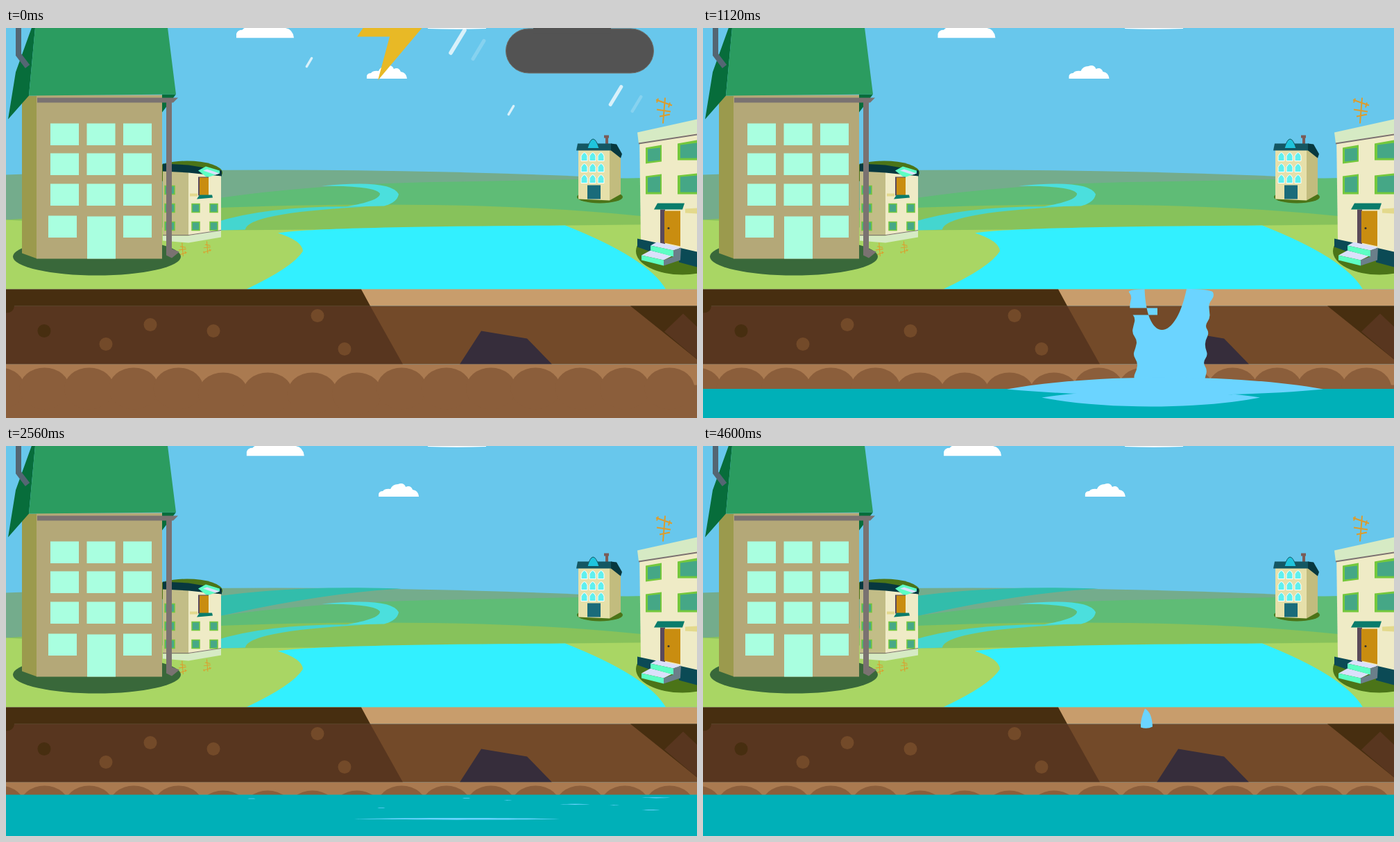
Recreate the animation shown at these times as an HTML page. Size 996x562 px, loop 4.64 s.

```html
<!DOCTYPE html>
<html lang="en">
<head>
<meta charset="utf-8">
<title>Rain seeping into the ground</title>
<style>
html, body { margin: 0; width: 100%; height: 100%; overflow: hidden; background: #68c7ec; }
svg { display: block; width: 100vw; height: 100vh; }
</style>
</head>
<body>
<svg viewBox="0 .5 996 562" preserveAspectRatio="none">
<defs>
  <path id="puff" d="M0 19V15Q1 11 6 11Q9 7 17 8Q20 1 28 1Q36-2 39 5Q46 2 49 9Q57 10 58 19Z" fill="#fff"/>
  <path id="aerial" d="M950 101L947 138M937 104l23 8M938 118l20 3M942 128l15-3M940 102l-2 6M957 108l-2 7" fill="none" stroke="#dd9c2c" stroke-width="2"/>
  <mask id="gaps" maskUnits="userSpaceOnUse" x="0" y="0" width="996" height="570">
    <path fill="#fff" d="M0 0H996V570H0Z"/><path id="gap"/>
  </mask>
  <clipPath id="below"><path d="M0 377H996V570H0Z"/></clipPath>
</defs>

<!-- sky -->
<use id="cloudA" href="#puff"/>
<use id="cloudB" href="#puff"/>
<path fill="#fff" d="M608 0H692V1.5Q650 3 608 1.5Z"/>
<path id="bolt" fill="#e8b926" d="M515 0H600L536 76L553 13H506Z"/>
<g id="storm" fill="#535353" stroke="#706f69"><rect x="720.5" y="1.5" width="213" height="64" rx="33"/><path stroke="none" d="M760 0h112v8h-112z"/></g>

<!-- hills and water -->
<path fill="#74ac8c" d="M0 212Q420 197 820 214L996 222V300H0Z"/>
<path id="farRiver" fill="#32bdab" d="M240 228Q380 199 570 206Q430 214 240 262Z"/>
<path fill="#5fbc76" d="M200 265Q380 225 650 222L996 215V300H200Z"/>
<path fill="#87c25b" d="M0 277Q560 236 910 271L996 278V310H0Z"/>
<path fill="#4bdfdd" d="M455 228Q556 218 566 240Q564 252 545 257L490 258Q540 249 539 239Q532 228 455 228Z"/>
<path fill="#44d6cf" d="M520 258Q380 255 300 281V293L345 291Q348 267 520 258Z"/>
<path fill="#a9d664" d="M0 277L310 292L600 290L806 285L996 283V377H0Z"/>
<path fill="#32f0ff" d="M392 296Q440 287 806 285Q925 332 951 377H346Q414 345 428 322Q427 307 392 296Z"/>

<!-- small house, left -->
<ellipse cx="261" cy="209" rx="51" ry="17" fill="#4b7418"/>
<path fill="#c2bd87" d="M226 206L263 208V300H226Z"/>
<path fill="#efebc6" d="M263 207L310 212V294L263 300Z"/>
<path fill="#07383f" d="M226 196L263 198L311 206V214L263 209L226 207Z"/>
<path fill="#5dffc4" d="M277 206L288 200L308 206V210L290 216Z"/>
<path fill="#dbe0fb" d="M284 206L290 204L308 210L302 212Z"/>
<path fill="#d6eac4" d="M226 300L263 300L310 292V302L263 310L226 307Z"/>
<path fill="none" stroke="#7a7271" d="M226 299H263L310 292"/>
<path fill="#5a4a5a" d="M277 215h15v27h-15z"/><path fill="#c98d10" d="M279 216h13v26h-13z"/>
<path fill="#0a7c6b" d="M279 241H297L298 245L275 247Z"/>
<path fill="#e3d98c" d="M265 239h11v4h-11z"/>
<g id="smallPanes" fill="#47a887" stroke="#74c83c" stroke-width="1.5"></g>
<use href="#aerial" transform="translate(-251 383) scale(.533 -.53)"/>
<use href="#aerial" transform="translate(-186 374) scale(.502 -.48)"/>

<!-- big house, left -->
<ellipse cx="131" cy="330" rx="121" ry="27" fill="#39683a"/>
<path fill="#9b9a4d" d="M23 98H45V333L23 325Z"/>
<path fill="#b4a878" d="M44 97H225V333H44Z"/>
<path fill="#076d3b" d="M37 0L14 64L3 132L33 98L42 0ZM225 96H245L225 122Z"/>
<path fill="#2b9c60" d="M42 0H233L245 96L33 98Z"/>
<path fill="none" stroke="#546673" stroke-width="8" d="M18 0V39L31 56"/>
<path fill="#7a7271" d="M45 101H248L241 108H239V319L250 323L239 332L231 328V108H45Z"/>
<g id="panes" fill="#a9ffe0"><path d="M117 272h41v61h-41z"/></g>

<!-- small house, right -->
<ellipse cx="856" cy="244" rx="33" ry="9" fill="#4b7418"/>
<path fill="#e6e0aa" d="M825 175H870V249L825 247Z"/>
<path fill="#c2bc7e" d="M870 175L886 186V240L870 249Z"/>
<path fill="#7a5c58" d="M862 155h7v4h-1v11h-4v-11h-2z"/>
<path fill="#145763" d="M824 167H873V177H822Z"/>
<path fill="#07383f" d="M872 167L880 168L888 182L886 188L872 177Z"/>
<path fill="#1fc4dd" stroke="#145763" d="M838 174Q846 147 855 174Z"/>
<g id="arches" fill="#5ff0ef" stroke="#fff"></g>
<path fill="#1a6b7a" d="M838 227h19v20h-19z"/>

<!-- big house, right -->
<ellipse cx="975" cy="322" rx="67" ry="34" fill="#4b7418"/>
<path fill="#efebc6" d="M913 152L996 135V326L915 306Z"/>
<path fill="#d6eac4" d="M910 151L996 132V152L912 167Z"/>
<path fill="none" stroke="#7a7271" stroke-width="2" d="M912 167L996 154"/>
<path fill="#74c83c" d="M922 173L945 169V193L922 196ZM968 167L996 162V191L968 191ZM922 214L945 211V240H922ZM968 213L996 210V240H968Z"/>
<path fill="#45a786" d="M925 175L943 173V191L925 193ZM972 169L996 166V188H972ZM925 216L943 214V237H925ZM972 215L996 213V237H972Z"/>
<path fill="#0b4a55" d="M910 304L938 310V326L910 316ZM970 317L996 323V345L970 338Z"/>
<path fill="#5a4a5a" d="M943 262h7v50h-7z"/><path fill="#c98d10" d="M949 264h23v51l-23-5z"/>
<circle cx="955" cy="289" r="1.5" fill="#333"/>
<path fill="#0a7c6b" d="M939 253H978L975 262H934Z"/>
<path fill="#e3d98c" d="M979 261L996 260V268L979 267Z"/>
<path fill="#dbe0fb" d="M938 309L973 317L962 321L929 314ZM929 321L960 329L948 335L916 328Z"/>
<path fill="#5dffc4" d="M929 314L962 321V330L929 321ZM916 328L948 335V343L916 335Z"/>
<path fill="#6b7f8a" d="M973 317L972 335L948 343V335L962 330V321Z"/>
<use href="#aerial"/>

<g id="rain" stroke="#fff" stroke-linecap="round"></g>

<!-- ground -->
<path fill="#c89d6c" d="M0 377H996V401H0Z"/>
<path fill="#734a29" d="M0 401H996V485H0Z"/>
<path fill="#58361f" d="M0 401H525L572 485H0Z"/>
<path fill="#472e10" d="M0 377H512L525 401H12Q11 411 0 411ZM900 401H996V478Z"/>
<path fill="#58361f" d="M949 438L976 412L996 431V478Z"/>
<path fill="#362d3b" d="M654 485L685 437L751 448L787 485Z"/>
<g id="stones" fill="#734a29"><circle cx="55" cy="437" r="9.5" fill="#472e10"/></g>
<path fill="#aa7a50" d="M0 485H996V570H0Z"/>
<g id="scallops" fill="#8b5e3b"><path d="M0 515H996V570H0Z"/></g>

<!-- moving water -->
<path id="table" fill="#00b0b8"/>
<g fill="#6bd4ff">
  <g mask="url(#gaps)"><path id="fall"/><path id="pool"/></g>
  <path id="ripples"/>
  <g clip-path="url(#below)"><path id="drop" d="M637 379Q647 384 648 405Q640 409 631 406Q630 395 637 379Z"/></g>
</g>
</svg>

<script>
const $ = id => document.getElementById(id);
const add = (id, markup) => $(id).insertAdjacentHTML('beforeend', markup);
const set = (id, name, value) => $(id).setAttribute(name, value);
const ramp = (t, a, b) => Math.max(0, Math.min(1, (t - a) / (b - a)));

function seeded(seed) {
  return () => (seed = seed * 16807 % 2147483647) / 2147483647;
}

// Repeated scenery
for (const y of [138, 181, 225, 271])
  for (const x of y > 250 ? [61, 169] : [64, 116.5, 169])
    add('panes', `<rect x="${x}" y="${y}" width="41" height="31.5"/>`);
for (const y of [180, 196, 212])
  for (const x of [829, 841, 853])
    add('arches', `<path d="M${x} ${y + 12}V${y + 5}Q${x + 5} ${y - 5} ${x + 9} ${y + 5}V${y + 12}Z"/>`);
for (const x of [229, 268, 294])
  for (const y of [228, 254, 280])
    if (x < 240 || y > 240) add('smallPanes', `<rect x="${x}" y="${y}" width="${x < 240 ? 14 : 11}" height="12"/>`);
for (const [x, y] of [[208, 428], [144, 456], [299, 437], [449, 415], [488, 463]])
  add('stones', `<circle cx="${x}" cy="${y}" r="9.5"/>`);
for (let i = -1; i < 15; i++)
  add('scallops', `<ellipse cx="${55.5 + i * 64.35}" cy="${i > 3 && i < 8 ? 527 : 520}" rx="36" ry="30"/>`);

// Closed curve through the midpoints of a list of points
function smooth(points) {
  const n = points.length;
  const mid = i => points[i % n].map((v, k) => (v + points[(i + 1) % n][k]) / 2).join(' ');
  return `M${mid(0)}` + points.map((_, i) => `Q${points[(i + 1) % n].join(' ')} ${mid(i + 1)}`).join('') + 'Z';
}

// Flat puddle, bulging by `up` and `down` around the line y
function lens(x, y, half, up, down = up) {
  const inner = half * .45, a = x - half, b = x + half;
  return `M${a} ${y}C${x - inner} ${y - up * 1.33} ${x + inner} ${y - up * 1.33} ${b} ${y}` +
         `C${x + inner} ${y + down * 1.33} ${x - inner} ${y + down * 1.33} ${a} ${y}Z`;
}

// Falling sheet with wobbling sides
function fallPath(t) {
  const top = 376 + 129 * ramp(t, 1150, 1380);
  const bottom = Math.min(525, 376 + 130 * ((t - 40) / 360) ** 1.5);
  const centre = 674 - 14 * Math.sin(Math.PI * ramp(t, 400, 1120));
  const half = (70 - 20 * ramp(t, 800, 1120)) * ramp(t, 0, 160);
  const flare = 12 * ramp(t, 600, 800), wobble = Math.min(4, (bottom - top) / 20);
  const left = [], right = [], steps = 14;
  for (let i = 0; i <= steps; i++) {
    const k = i / steps, y = top + (bottom - top) * k, s = y - t * .25;
    const reach = half + flare * (1 - k) ** 3;
    left.push([centre - reach + wobble * Math.sin(s * .19), y]);
    right.unshift([centre + reach + wobble * Math.sin(s * .23 + 2), y]);
  }
  return smooth([...left, ...right]);
}

// Opening in the sheet that closes and reopens, then a slit on its left
function gapPath(t) {
  const depth = 415 + 31 * Math.cos((t - 400) / 360 * Math.PI);
  const lid = 386 - 18 * ramp(t, 600, 780), half = (depth - 370) * .41, x = 672 - t * .004;
  const hole = `M${x - half} ${lid}C${x - half} ${depth + 12} ${x + half * .5} ${depth + 12} ${x + half} ${lid}Z`;
  const slit = ramp(t, 900, 1120) * 5;
  return hole + `M600 ${409 - slit}H655V${409 + slit}H600Z`;
}

function poolPath(t) {
  const half = 240 * (1 - Math.exp((430 - t) / 230)), x = 682 - (t - 800) * .05;
  const thick = ramp(t, 430, 600) * (1 - ramp(t, 1150, 1600));
  const sink = 12 * ramp(t, 800, 1120);
  return lens(x, 521, half, 17 * thick, 9 * thick) + lens(x - sink * 1.7, 521 + sink, half * .69, 10 * thick, 13 * thick);
}

// One long wave and scattered small ones, drifting outward
function ripplePath(t, { start, peak, end, x, y, spread, seed }) {
  if (t < start || t > end) return '';
  const random = seeded(seed), size = Math.min(ramp(t, start, peak), ramp(t, end, peak));
  const grow = 1 + (t - peak) * .00025;
  let d = lens(x, y, spread * .5 * grow, 5 * size, 4 * size);
  for (let i = 0; i < 8; i++) {
    const offset = (random() * 2 - 1) * spread, half = 5 + 45 * random() ** 3;
    d += lens(x + offset * grow, 505 + random() * 20, half * grow, (1 + half * .06) * size);
  }
  return d;
}
const bursts = [
  { start: 1300, peak: 2000, end: 2780, x: 650, y: 538, spread: 260, seed: 77 },
  { start: 2560, peak: 3080, end: 3860, x: 628, y: 516, spread: 140, seed: 41 }];

// Each spot flashes a falling streak, again 400 ms later, and long ones have a faint neighbour
const spots = [[437, 50, 14, 0], [651, 20, 38, 0], [728, 119, 14, 0], [879, 98, 30, 0], [952, 86, 20, 800]];
function rainMarkup(t) {
  let markup = '';
  const streak = (x, y, length, age, alpha) => {
    const fade = (1 - Math.abs(age) / 240) * ramp(t, 1040, 900);
    if (fade <= 0) return;
    const dx = length * .26, dy = length * .43;
    markup += `<path d="M${x - dx} ${y + dy}L${x + dx} ${y - dy}" stroke-width="${2 + length * .1}" opacity="${alpha * fade}" transform="translate(${-age * .05} ${age * .086})"/>`;
  };
  for (const [x, y, length, born] of spots) {
    streak(x, y, length, t - born, .75);
    streak(x, y, length + 5, t - born - 400, .4);
    if (length > 25) streak(x + 30, y + 12, length * .8, t - born, .2);
  }
  return markup;
}

function draw(t) {
  set('cloudA', 'transform', `translate(${332 + Math.min(t, 2600) * .0058} -12.5) scale(1.43)`);
  set('cloudB', 'transform', `translate(${520 + t * .0067} 54.5)`);
  set('bolt', 'transform', `translate(${t * .0067} 0)`);
  set('bolt', 'opacity', ramp(t, 520, 0));
  set('storm', 'transform', `translate(${t * .005} 0)`);
  set('storm', 'opacity', ramp(t, 700, 440));
  set('farRiver', 'opacity', ramp(t, 1500, 1960));
  $('rain').innerHTML = rainMarkup(t);

  set('table', 'd', `M0 ${562.5 - 59.5 * ramp(t, 690, 1300)}H996V570H0Z`);
  set('fall', 'd', t > 40 && t < 1380 ? fallPath(t) : '');
  set('gap', 'd', gapPath(t));
  set('pool', 'd', t > 430 && t < 1600 ? poolPath(t) : '');
  set('ripples', 'd', bursts.map(b => ripplePath(t, b)).join(''));

  const falling = t >= 4000 && t < 4320;
  const shift = falling ? 137 * ramp(t, 4000, 4320) ** 2 : 30 * ramp(t, 4480, 4600);
  set('drop', 'opacity', falling || t > 4480 ? 1 : 0);
  set('drop', 'transform', `translate(0 ${shift - 30})`);
}

const start = performance.now();
function frame() {
  const t = (performance.now() - start) % 4640;
  draw(Math.floor(t / 40) * 40);
  requestAnimationFrame(frame);
}
frame();
</script>
</body>
</html>
```
